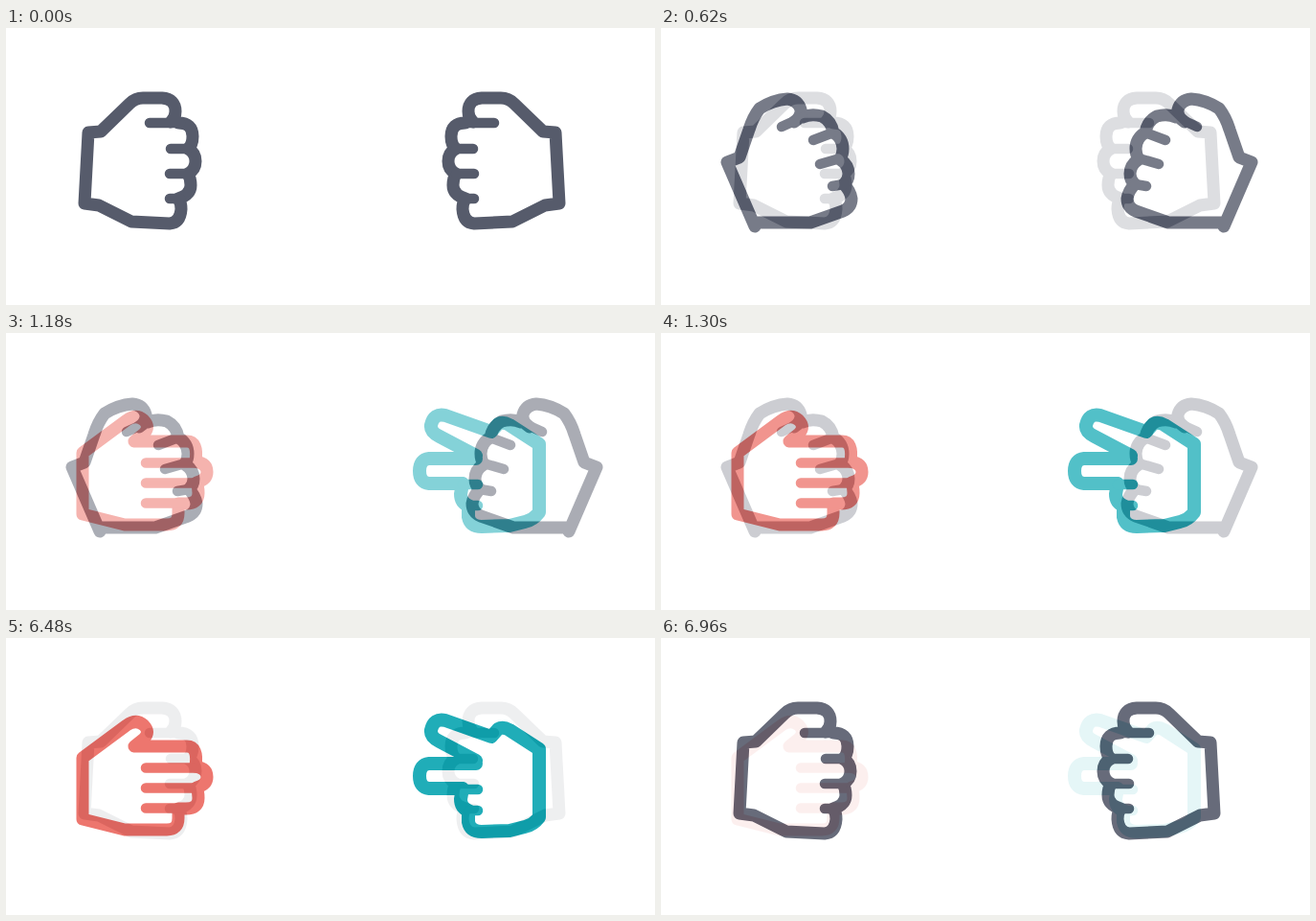
These frames come from a looping animation (678 by 289 pixels, 7.02 s). An HTML page:

```html
<!DOCTYPE html>
<html lang="en">
<head>
<meta charset="utf-8">
<title>Rock paper scissors</title>
<style>
  html, body { margin: 0; width: 100%; height: 100%; overflow: hidden; background: #fff; }
  svg { display: block; width: 100%; height: 100%; }
  .bg { fill: #fff; stroke: none; }
  .hand { fill: none; stroke-width: 13; stroke-linecap: round; stroke-linejoin: round; }
  .thin { stroke-width: 10.5; }
  .slate { stroke: #565b6b; }
  .red { stroke: #eb675e; }
  .teal { stroke: #08a5b1; stroke-width: 14; }

  /* each scene is opaque, so fading it in blends evenly with the one below */
  .swing, .play, .reset { opacity: 0; animation: 7.02s infinite; }
  .swing { animation-name: swing; }
  .play { animation-name: play; }
  .reset { animation-name: reset; }
  @keyframes swing {
    0% { opacity: 0; }
    2.848% { opacity: 0; animation-timing-function: steps(10, start); }
    11.395%, 100% { opacity: 1; }
  }
  @keyframes play {
    0% { opacity: 0; }
    13.389% { opacity: 0; animation-timing-function: steps(10, start); }
    21.936%, 100% { opacity: 1; }
  }
  @keyframes reset {
    0% { opacity: 0; }
    92.306% { opacity: 0; animation-timing-function: steps(9, start); }
    100% { opacity: .9; }
  }
</style>
</head>
<body>
<svg viewBox="0 0 678 289">
  <defs>
    <g id="fist">
      <path d="M172 98Q177 94 177 87Q177 74 163 73H143Q135 73 129 79L99 108L86 109L82 183L97 185L131 202L171 204Q182 203 183 189Q183 182 180 178Q193 174 193 164Q193 157 190 152Q198 148 198 139Q198 130 190 126Q195 122 195 113Q195 99 180 99"/>
      <path class="thin" d="M150 99H182M172 126H190M171 152H190M171 178H182"/>
    </g>
    <g id="raised">
      <path d="M139 98Q147 93 146 85Q143 75 132 74Q117 75 103 84Q96 93 92 106L82 135L69 140L98 207L100 203H156L190 191Q199 187 199 178Q198 170 191 163Q196 159 196 152Q196 143 187 137Q190 132 190 126Q190 115 180 109Q178 97 168 92Q157 89 148 93"/>
      <path class="thin" d="M126 103L148 93M159 117L180 109M166 142L187 136M179 165L191 163"/>
    </g>
    <g id="rest">
      <rect class="bg" width="678" height="289"/>
      <g class="hand slate">
        <use href="#fist"/>
        <use href="#fist" transform="translate(660) scale(-1 1)"/>
      </g>
    </g>
  </defs>

  <use href="#rest"/>

  <g class="swing">
    <rect class="bg" width="678" height="289"/>
    <g class="hand slate">
      <use href="#raised"/>
      <use href="#raised" transform="translate(686) scale(-1 1)"/>
    </g>
  </g>

  <g class="play">
    <rect class="bg" width="678" height="289"/>
    <g class="hand red">
      <path d="M134 113L144 105Q151 98 144 91Q136 84 126 91L80 125V189L124 200H168Q180 200 180 188V178H188Q201 178 201 167Q201 160 199 156Q210 153 210 145Q210 136 198 134Q201 113 189 113H134"/>
      <path class="thin" d="M146 135.5H197M146 156.5H200M146 177.5H188"/>
    </g>
    <g class="hand teal">
      <path d="M491 128L453 108Q443 103 444 96Q447 83 459 86L507 103L514 95Q519 92 526 96L557 116V187Q551 195 542 197L526 201L497 202Q485 202 483 192V180Q475 177 475 168L477 157H442Q432 156 432 144Q432 132 442 131H491"/>
      <path class="thin" d="M477 158H493M484 180H493"/>
    </g>
  </g>

  <use class="reset" href="#rest"/>
</svg>
</body>
</html>
```
